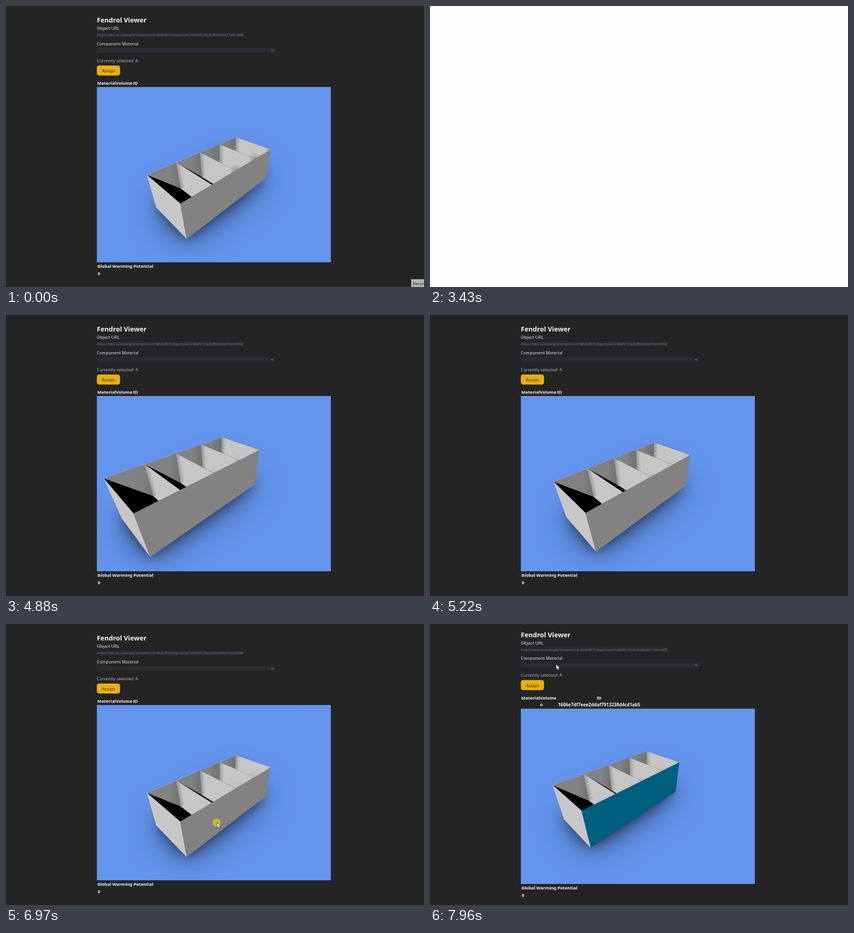
Write an HTML page with a canvas that moves like this. It is 911 px wide and 614 px high and loops after 8 s.

```html
<!DOCTYPE html>
<html lang="en">
<head>
<meta charset="utf-8">
<title>Viewer</title>
<style>
html, body { margin: 0; width: 100%; height: 100%; overflow: hidden; background: #242424; }
canvas { display: block; }
</style>
</head>
<body>
<canvas id="stage" width="911" height="614"></canvas>
<script>
const ctx = document.getElementById('stage').getContext('2d');
const LOOP = 8000, HIDE = 3430, SHOW = 4220, LOAD = 4680, ZOOM = 6975, PICK = 7030;
const CELLS = 4, FLOOR = .82;

// Camera views: rim corners left, back, right, front, then base front and base right
const rest = [[307, 369], [501, 287], [577, 313.5], [380, 432], [393, 508], [567, 377]];
const wide = [[213, 357], [470, 267], [552, 295], [278, 434], [314, 528], [542, 371]];
const near = [[267, 344], [472, 270], [543, 294], [330, 400], [350, 481], [535, 359]];

// Pointer moves: start, end, from, to
const moves = [
  [70, 580, [930, 620], [-20, 10]],
  [5880, 6900, [-12, 230], [460, 434]],
  [7150, 7900, [460, 434], [275, 88]]
];

const mix = (a, b, k) => a + (b - a) * k;
const mixPt = (p, q, k) => [mix(p[0], q[0], k), mix(p[1], q[1], k)];
const sub = (p, q) => [p[0] - q[0], p[1] - q[1]];
const dot = (p, q) => p[0] * q[0] + p[1] * q[1];
const cross = (p, q) => p[0] * q[1] - p[1] * q[0];
// What is left of a critically damped move after s milliseconds
const damp = (s, w) => { const x = Math.max(0, s) * w / 1000; return (1 + x) * Math.exp(-x); };

function view(t) {
  let goal = rest, k = 0;
  if (t >= ZOOM) {
    goal = near;
    k = 1 - damp(t - ZOOM, 7);
  } else if (t >= LOAD) {
    goal = wide;
    k = damp(t - LOAD, 4.4) / damp(200, 4.4);
  }
  return rest.map((p, i) => mixPt(p, goal[i], k));
}

// Perspective map of the unit box: u along, v across, d down
function projector([L, B, R, F, baseF, baseR]) {
  const e1 = sub(B, R), e2 = sub(F, R), s = sub(sub(L, B), sub(F, R));
  const g = cross(s, e2) / cross(e1, e2), h = cross(e1, s) / cross(e1, e2);
  const drop = (base, rim, w) => sub(base, rim).map(x => x * w);
  const dropF = drop(baseF, F, 1 + h), dropR = drop(baseR, R, 1 + g + h);
  const edge = sub(baseF, baseR);
  const k = -dot(edge, sub(dropF, dropR)) / dot(edge, edge);
  return (u, v, d) => [0, 1].map(i => {
    const along = B[i] * (1 + g) - L[i], across = F[i] * (1 + h) - L[i];
    const down = (dropF[i] + dropR[i] + k * (baseF[i] + baseR[i])) / 2;
    return (L[i] + u * along + v * across + d * down) / (1 + u * g + v * h + d * k);
  });
}

function trace(pts) {
  ctx.beginPath();
  pts.forEach(p => ctx.lineTo(p[0], p[1]));
  ctx.closePath();
}

function poly(fill, ...pts) {
  trace(pts);
  ctx.fillStyle = fill;
  ctx.fill();
}

function text(str, x, y, size, color, weight = 400, align = 'left') {
  ctx.font = `${weight} ${size}px "Noto Sans", "Open Sans", sans-serif`;
  ctx.textAlign = align;
  ctx.fillStyle = color;
  ctx.fillText(str, x, y);
}

const label = (str, x, y, align, size = 9.5) => text(str, x, y, size, '#f4f4f4', 700, align);

function rect(x, y, w, h, color, r = 0) {
  ctx.fillStyle = color;
  ctx.beginPath();
  ctx.roundRect(x, y, w, h, r);
  ctx.fill();
}

function fade(gradient, from, to) {
  gradient.addColorStop(0, from);
  gradient.addColorStop(1, to);
  return gradient;
}

function shadow(pts, blur, alpha) {
  ctx.save();
  // The caster sits off stage, only its shadow is seen
  ctx.shadowOffsetX = 2000;
  ctx.shadowBlur = blur;
  ctx.shadowColor = `rgba(0,0,0,${alpha})`;
  poly('#000', ...pts.map(p => [p[0] - 2000, p[1]]));
  ctx.restore();
}

function drawCell(at, i) {
  const u = i / CELLS, next = (i + 1) / CELLS;
  const a = at(u, 0, 0), top = at(next, 0, 0), tip = at(next, 0, FLOOR);
  const open = [a, top, at(next, 1, 0), at(u, 1, 0)];
  ctx.save();
  trace(open);
  ctx.clip();
  // Soft dark strip where the divider meets the back wall
  const [dx, dy] = sub(tip, top), len = Math.hypot(dx, dy);
  const side = [dy / len * 10, -dx / len * 10];
  const out = p => [p[0] + side[0], p[1] + side[1]];
  const strip = ctx.createLinearGradient(...top, ...out(top));
  poly(fade(strip, 'rgba(100,100,100,.5)', 'rgba(140,140,140,0)'), top, tip, out(tip), out(top));
  const x = Math.max(top[0], tip[0]);
  poly(fade(ctx.createLinearGradient(x - 24, 0, x, 0), '#828282', '#707070'), a, top, tip);
  poly('#000', a, tip, at(next, 1, FLOOR), open[3]);
  ctx.restore();
}

function drawBox(t) {
  const at = projector(view(t));
  const ring = d => [at(0, 0, d), at(1, 0, d), at(1, 1, d), at(0, 1, d)];
  const rim = ring(0), base = ring(1);
  shadow(base, 28, .5);
  shadow(base, 74, .6);

  poly('#c6c6c6', ...rim);
  ctx.save();
  trace(rim);
  ctx.clip();
  const dark = `rgba(110,110,110,${t < HIDE ? .5 : .12})`;
  for (const u of [.5, .75, 1]) {
    const [x, y] = at(u, 1, 0);
    rect(x - 15, y - 15, 30, 30, fade(ctx.createRadialGradient(x, y, 0, x, y, 15), dark, 'rgba(110,110,110,0)'));
  }
  for (let i = 0; i < CELLS; i++) drawCell(at, i);
  ctx.restore();

  poly('#c7c7c7', rim[0], rim[3], base[3], base[0]);
  poly(t >= PICK ? '#005f7e' : '#828282', rim[3], rim[2], base[2], base[3]);
}

function drawHeader(on) {
  text('Fendrol Viewer', 198, 36, 14.5, '#f4f4f4', 600);
  text('Object URL', 198, 52, 9.5, '#e2e2e2');
  rect(198, 58, 320, 10, '#292830');
  text('https://dev.vo.example/streams/c41862b907/objects/ab7e40d9135c82f6e0b4d17a9c360f', 198, 66.2, 7.66, '#76708c');
  text('Component Material', 198, 85.5, 9.4, '#e2e2e2');
  rect(198, 92, 388, 10, '#2b2a33');
  ctx.beginPath();
  ctx.moveTo(577.5, 96);
  ctx.lineTo(580, 98.5);
  ctx.lineTo(582.5, 96);
  ctx.strokeStyle = '#b0aebb';
  ctx.lineWidth = 1;
  ctx.stroke();
  text('Currently selected: A', 198, 122.5, 9.3, '#b4b2c0');
  rect(198, 130, 50.5, 22, '#eab00c', 5);
  text('Assign', 223.5, 145, 9.4, '#2c2718', 400, 'center');
  label('Material', 199, 172);
  label('Volume', 257.5, 172, 'center');
  label('ID', on ? 368.5 : 282, 172, 'center');
}

function drawPage(t) {
  const on = t >= PICK;
  rect(0, 0, 911, 614, '#242424');

  ctx.save();
  ctx.translate(0, on ? -7.5 : 0);
  drawHeader(on);
  ctx.restore();
  if (on) {
    label('0', 243, 180, 'center');
    label('1606e7df7eee2ddaf7913238d4cd1ab5', 368.5, 180, 'center', 9.75);
  }

  ctx.save();
  ctx.translate(0, on ? 8 : 0);
  label('Global Warming Potential', 199, 572);
  label('0', 200, 587.5);
  rect(198, 177, 510, 383, '#6495ed');
  ctx.clip();
  if (t < HIDE || t >= LOAD) drawBox(t);
  ctx.restore();

  if (t < 70) {
    rect(883, 597, 28, 17, '#b4b4b4');
    text('Record', 887, 610, 8.8, '#333');
  }
}

function drawCursor(t) {
  const move = moves.findLast(m => t >= m[0]);
  if (!move) return;
  const [start, end, from, to] = move;
  const k = Math.min(1, (t - start) / (end - start));
  const [x, y] = mixPt(from, to, k * (2 - k));
  if (t >= 6900 && t < PICK) {
    ctx.beginPath();
    ctx.arc(x - 1, y, 9, 0, 7);
    ctx.fillStyle = '#c0ba3c';
    ctx.fill();
  }
  ctx.save();
  ctx.translate(x, y);
  trace([[0, 0], [0, 11.5], [2.6, 9], [4.4, 13], [6.3, 12.2], [4.6, 8.3], [8.2, 8.3]]);
  ctx.fillStyle = '#fff';
  ctx.fill();
  ctx.strokeStyle = '#222';
  ctx.lineWidth = .8;
  ctx.stroke();
  ctx.restore();
}

function draw(now) {
  const t = now % LOOP;
  if (t >= HIDE && t < SHOW) {
    rect(0, 0, 911, 614, '#fefefe');
  } else {
    drawPage(t);
    drawCursor(t);
  }
}

let start;
function tick(now) {
  start ??= now;
  draw(now - start);
  requestAnimationFrame(tick);
}
draw(0);
requestAnimationFrame(tick);
</script>
</body>
</html>
```
